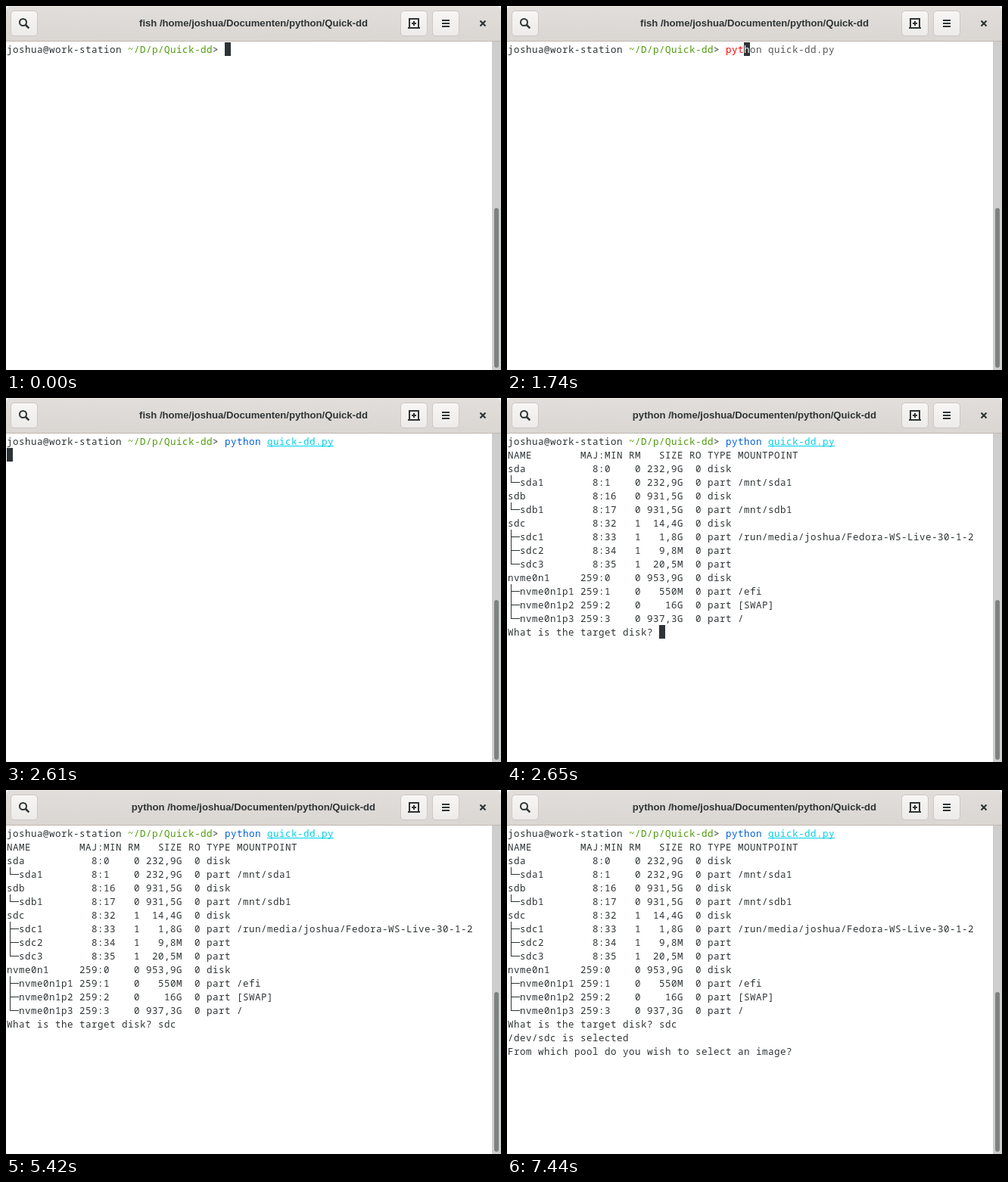
An HTML page that plays this animation: 654x481 px, repeating every 8000 ms.

```html
<!DOCTYPE html>
<html lang="en">
<head>
<meta charset="utf-8">
<title>Terminal</title>
<style>
  html, body { margin: 0; width: 100%; height: 100%; overflow: hidden; background: #fff; }
  #stage { position: relative; width: 654px; height: 481px; overflow: hidden; background: #fff; color: #2e3436; }
  #stage > * { position: absolute; }
  #header { left: 0; top: 0; }
  #title {
    left: 0; top: 13px; width: 654px; text-align: center; white-space: pre;
    font: bold 13.1px/20px "Liberation Sans", Arial, sans-serif;
  }
  #track { left: 642px; top: 47px; width: 12px; height: 434px; background: #cecece; }
  #thumb { left: 645px; top: 267px; width: 6px; height: 211px; border-radius: 3px; background: #7e8182; }
  #screen, #cursor {
    margin: 0; white-space: pre;
    font: 350 12.5px/18px "Noto Sans Mono", monospace;
    letter-spacing: calc(8px - 1ch);
    font-variant-ligatures: none;
  }
  #screen { left: 1px; top: 49px; }
  #screen div { height: 18px; }
  #cursor { width: 8px; height: 18px; line-height: 20px; background: #2e3436; color: #fff; overflow: hidden; }
  .path { color: #4e9a06; }
  .error { color: #f00; }
  .hint { color: #555; }
  .command { color: #005fd7; }
  .file { color: #00cfe6; text-decoration: underline 1px; text-underline-offset: 1px; text-decoration-skip-ink: none; }
  .branch {
    display: inline-block; position: relative; top: -1px;
    width: 16px; height: 18px; vertical-align: top;
    background:
      linear-gradient(#2e3436, #2e3436) 4px 0 / 1px var(--stem) no-repeat,
      linear-gradient(#2e3436, #2e3436) 4px 9px / 12px 1px no-repeat;
  }
</style>
</head>
<body>
<div id="stage">
  <svg id="header" width="654" height="47" fill="none" stroke="#2e3436" stroke-width="2">
    <defs>
      <linearGradient id="bar" x2="0" y2="1"><stop stop-color="#e1dedb"/><stop offset="1" stop-color="#dad6d2"/></linearGradient>
      <linearGradient id="face" x2="0" y2="1"><stop stop-color="#f7f6f5"/><stop offset="1" stop-color="#edebe9"/></linearGradient>
    </defs>
    <path d="M0 47V7Q0 0 7 0H647Q654 0 654 7V47Z" fill="url(#bar)" stroke="none"/>
    <path d="M6 .5H648" stroke="#efedec" stroke-width="1"/>
    <path d="M0 46.5H654" stroke="#bfb8b1" stroke-width="1"/>
    <g fill="url(#face)" stroke="#cdc7c2" stroke-width="1">
      <rect x="6.5" y="6.5" width="35" height="33" rx="4.5"/>
      <rect x="521.5" y="6.5" width="35" height="33" rx="4.5"/>
      <rect x="563.5" y="6.5" width="35" height="33" rx="4.5"/>
    </g>
    <circle cx="22.5" cy="21.5" r="4.5"/>
    <path d="M25.5 24.5L30.3 29.3" stroke-width="2.6"/>
    <path d="M533 28V17H545V28M531 29H547M539 20V26M536 23H542"/>
    <path d="M576 19H586M576 23H586M576 27H586"/>
    <path d="M626.5 19.5L633.5 26.5M633.5 19.5L626.5 26.5" stroke-width="2.2"/>
  </svg>
  <div id="title"></div>
  <div id="track"></div>
  <div id="thumb"></div>
  <pre id="screen"></pre>
  <pre id="cursor"></pre>
</div>
<script>
const LOOP = 8000;
const USER = "joshua", HOST = "work-station";
const COMMAND = "python quick-dd.py";
const PROMPT_WIDTH = 36;
const DISK_QUESTION = "What is the target disk? ";
const POOL_QUESTION = "From which pool do you wish to select an image? ";
const TABLE = `NAME        MAJ:MIN RM   SIZE RO TYPE MOUNTPOINT
sda           8:0    0 232,9G  0 disk
└─sda1        8:1    0 232,9G  0 part /mnt/sda1
sdb           8:16   0 931,5G  0 disk
└─sdb1        8:17   0 931,5G  0 part /mnt/sdb1
sdc           8:32   1  14,4G  0 disk
├─sdc1        8:33   1   1,8G  0 part /run/media/${USER}/Fedora-WS-Live-30-1-2
├─sdc2        8:34   1   9,8M  0 part
└─sdc3        8:35   1  20,5M  0 part
nvme0n1     259:0    0 953,9G  0 disk
├─nvme0n1p1 259:1    0   550M  0 part /efi
├─nvme0n1p2 259:2    0    16G  0 part [SWAP]
└─nvme0n1p3 259:3    0 937,3G  0 part /`.split("\n");

// Pairs of start time and number of characters present
const COMMAND_KEYS = [[1320, 1], [1580, 2], [1740, 3], [1840, 4], [2360, 18]];
const DISK_KEYS = [[4390, 1], [4590, 2], [4850, 3]];
const HINT = 1360, ENTER = 2610, OUTPUT = 2650, SELECTED = 5690;
const CURSOR_OFF = [[40, 630], [1230, 1320], [3170, 3770], [5420, 5650], [6240, 6840], [7440, LOOP]];

const element = id => document.getElementById(id);
const typed = (keys, t) => keys.reduce((count, [at, n]) => t >= at ? n : count, 0);
const span = (kind, text) => `<span class="${kind}">${text}</span>`;
const branches = line => line
  .replace("├─", '<span class="branch" style="--stem:18px"></span>')
  .replace("└─", '<span class="branch" style="--stem:10px"></span>');

function commandLine(t, count) {
  const prompt = `${USER}@${HOST} ${span("path", "~/D/p/Quick-dd")}&gt; `;
  if (count === COMMAND.length) {
    const [program, file] = COMMAND.split(" ");
    return `${prompt}${span("command", program)} ${span("file", file)}`;
  }
  const entered = COMMAND.slice(0, count);
  if (t < HINT) return prompt + entered;
  return prompt + span("error", entered) + span("hint", COMMAND.slice(count));
}

function terminal(t) {
  const count = typed(COMMAND_KEYS, t);
  const lines = [commandLine(t, count)];
  let row = 0, column = PROMPT_WIDTH + count, under = "";
  if (t >= HINT && t < ENTER) under = COMMAND[count] || "";
  if (t >= ENTER) { row = 1; column = 0; }
  if (t >= OUTPUT) {
    const answer = "sdc".slice(0, typed(DISK_KEYS, t));
    lines.push(...TABLE.map(branches), DISK_QUESTION + answer);
    row = 14;
    column = DISK_QUESTION.length + answer.length;
  }
  if (t >= SELECTED) {
    lines.push("/dev/sdc is selected", POOL_QUESTION);
    row = 16;
    column = POOL_QUESTION.length;
  }
  return { html: lines.map(line => `<div>${line}</div>`).join(""), row, column, under };
}

let shown = "";
function draw(now) {
  const t = now % LOOP;
  const { html, row, column, under } = terminal(t);
  if (html !== shown) element("screen").innerHTML = shown = html;
  element("title").textContent =
    `${t < OUTPUT ? "fish" : "python"} /home/${USER}/Documenten/python/Quick-dd`;
  const cursor = element("cursor");
  cursor.textContent = under;
  cursor.style.left = `${1 + 8 * column}px`;
  cursor.style.top = `${48 + 18 * row}px`;
  cursor.style.visibility = CURSOR_OFF.some(([from, to]) => t >= from && t < to) ? "hidden" : "visible";
}

const start = performance.now();
function tick() {
  draw(performance.now() - start);
  requestAnimationFrame(tick);
}
tick();
</script>
</body>
</html>
```
